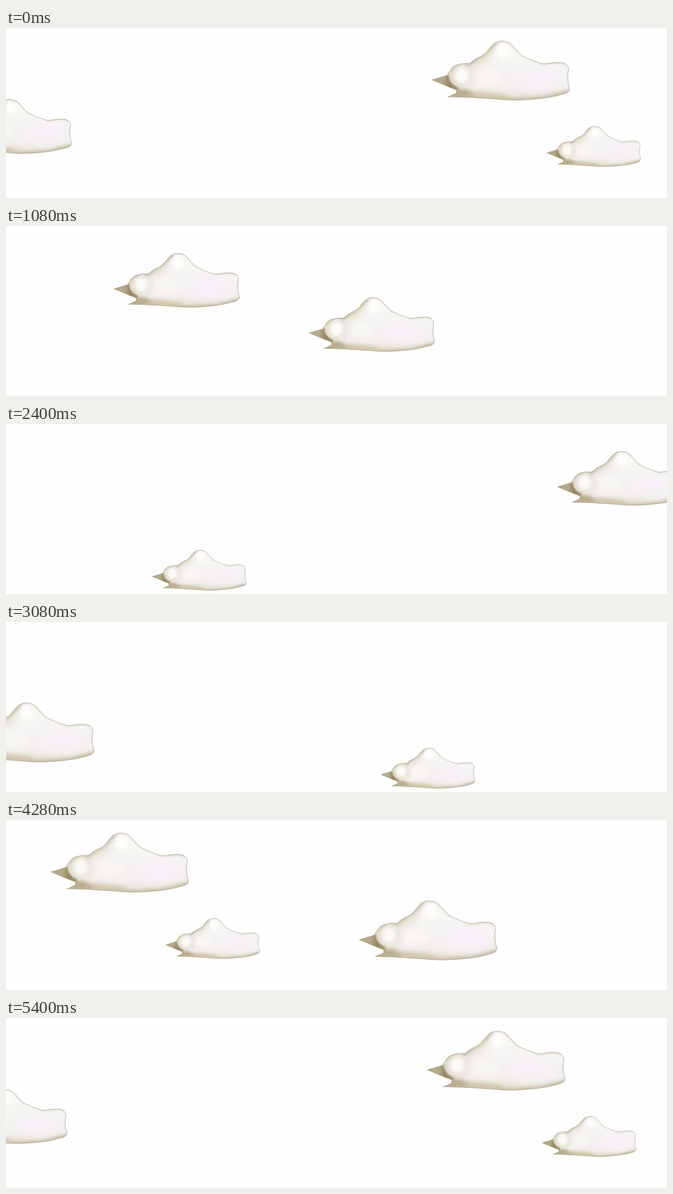
Write an HTML page that moves like this. It is 1280 by 331 pixels and loops after 5.44 s.

```html
<!DOCTYPE html>
<html lang="en">
<head>
<meta charset="utf-8">
<title>Drifting clouds</title>
<style>
  html, body { margin: 0; width: 100%; height: 100%; overflow: hidden; background: #fefefe; }
  svg { display: block; }
</style>
</head>
<body>
<svg id="sky" width="1280" height="331" viewBox="0 0 1280 331">
  <defs>
    <filter id="soft2" filterUnits="userSpaceOnUse" x="-20" y="-20" width="310" height="160" color-interpolation-filters="sRGB"><feGaussianBlur stdDeviation="2"/></filter>
    <filter id="soft4" filterUnits="userSpaceOnUse" x="-20" y="-20" width="310" height="160" color-interpolation-filters="sRGB"><feGaussianBlur stdDeviation="4"/></filter>
    <filter id="soft8" filterUnits="userSpaceOnUse" x="-30" y="-30" width="330" height="180" color-interpolation-filters="sRGB"><feGaussianBlur stdDeviation="8"/></filter>
    <linearGradient id="body" x1="0" y1="0" x2="0" y2="1">
      <stop offset="0" stop-color="#faf9f5"/>
      <stop offset=".5" stop-color="#f6f4f3"/>
      <stop offset=".8" stop-color="#f2efec"/>
      <stop offset="1" stop-color="#e6e0d2"/>
    </linearGradient>
    <linearGradient id="beak" gradientUnits="userSpaceOnUse" x1="0" y1="76" x2="46" y2="84">
      <stop offset="0" stop-color="#b3a88e"/>
      <stop offset=".45" stop-color="#b5a98c"/>
      <stop offset=".8" stop-color="#94845f"/>
      <stop offset="1" stop-color="#b9ad90"/>
    </linearGradient>
    <clipPath id="edge"><path class="outline"/></clipPath>
    <g id="cloud">
      <g clip-path="url(#edge)">
        <path class="outline" fill="url(#body)"/>
        <ellipse cx="205" cy="74" rx="52" ry="24" fill="#f5f1f6" filter="url(#soft8)"/>
        <g fill="none" stroke-linecap="round">
          <path d="M70 46L84 35 101 25 112 13 122 2" stroke="#b5ab90" stroke-width="9" filter="url(#soft4)"/>
          <path d="M80 50Q98 44 112 25" stroke="#e3ddcf" stroke-width="10" filter="url(#soft8)"/>
          <path d="M122 2Q136 -3 151 3L174 27 216 44 248 41 260 45" stroke="#d3cab8" stroke-width="4" filter="url(#soft2)"/>
          <path d="M267 50L264 72 269 94 255 106" stroke="#d9d1c6" stroke-width="4" filter="url(#soft2)"/>
          <path d="M30 112L68 112 118 115 163 118 218 114 264 102" stroke="#b3a78a" stroke-width="8" filter="url(#soft4)"/>
          <path d="M48 103Q90 104 140 111" stroke="#d0c6ac" stroke-width="11" filter="url(#soft4)"/>
          <path d="M73 52Q86 68 72 90" stroke="#e7e1d6" stroke-width="6" filter="url(#soft4)"/>
        </g>
        <path d="M34 84Q46 96 64 94L84 108 30 112Z" fill="#b8ab8b" filter="url(#soft4)"/>
        <path d="M-4 76L30 65Q32 82 50 92L50 98Z" fill="url(#beak)"/>
        <path d="M32 64Q31 82 50 93" fill="none" stroke="#96875f" stroke-width="5" filter="url(#soft2)"/>
        <ellipse cx="54" cy="67" rx="21" ry="22" fill="#e2dccd" filter="url(#soft2)"/>
        <ellipse cx="58" cy="67" rx="15" ry="17" fill="#fbfaf8" filter="url(#soft4)"/>
        <path d="M33 60L43 49 58 43 74 43" fill="none" stroke="#c8bea7" stroke-width="4" filter="url(#soft2)"/>
        <ellipse cx="137" cy="20" rx="11" ry="13" fill="#fffefc" filter="url(#soft4)"/>
        <ellipse cx="112" cy="70" rx="25" ry="15" fill="#f9f7f4" filter="url(#soft8)"/>
      </g>
      <path class="outline" fill="none" stroke="#8d7c5c" stroke-width=".8" stroke-opacity=".65" stroke-linejoin="round"/>
    </g>
  </defs>
</svg>
<script>
const bulb = [[30,67],[33,60],[43,49],[58,44.5],[73,44]];
const crown = [
  [73,44],[83,36],[101,26],[112,14],[122,4],[135,.4],[150,4],[161,15],[174,28],
  [188,35],[203,41],[217,44.5],[233,42.5],[248,42],[259,45],[264.5,54],[263,68],
  [264,83],[266.5,93],[264,99],[253,104],[218,111.5],[163,115.6],[118,113],[68,110],[31,109]
];

// Smooth curve through the points (Catmull-Rom)
function curve(pts) {
  let d = '';
  for (let i = 0; i < pts.length - 1; i++) {
    const b = pts[i], c = pts[i + 1], a = pts[i - 1] || b, e = pts[i + 2] || c;
    const ctrl1 = b.map((v, k) => v + (c[k] - a[k]) / 6);
    const ctrl2 = c.map((v, k) => v - (e[k] - b[k]) / 6);
    d += `C${ctrl1} ${ctrl2} ${c}`;
  }
  return d;
}

const outline = `M0 76L30 67${curve(bulb)}${curve(crown)}L47 102L48 96L26 87Z`;
document.querySelectorAll('.outline').forEach(p => p.setAttribute('d', outline));

const LOOP = 5440, STEP = 40, SPEED = 26.02, LAP = 3521.7;
const clouds = [
  { x: 825, y: 25, size: 1 },
  { x: -116, y: 139, size: .912 },
  { x: -493.5, y: 53, size: .912 },
  { x: -1278, y: 245, size: .684 },
  { x: -2100, y: 157, size: 1 },
  { x: 1046.5, y: 191, size: .684 }
];

const sky = document.getElementById('sky');
for (const c of clouds) {
  c.el = document.createElementNS('http://www.w3.org/2000/svg', 'use');
  c.el.setAttribute('href', '#cloud');
  sky.append(c.el);
}

let last = -1;
function draw(now) {
  const step = Math.floor((now % LOOP) / STEP);
  if (step === last) return;
  last = step;
  for (const { el, x, y, size } of clouds) {
    let left = x + step * SPEED;
    if (left > 1300) left -= LAP;
    el.setAttribute('transform', `translate(${Math.round(left)} ${y}) scale(${size})`);
    el.setAttribute('visibility', left > -280 ? 'visible' : 'hidden');
  }
}

const start = performance.now();
function tick() {
  draw(performance.now() - start);
  requestAnimationFrame(tick);
}
tick();
</script>
</body>
</html>
```
